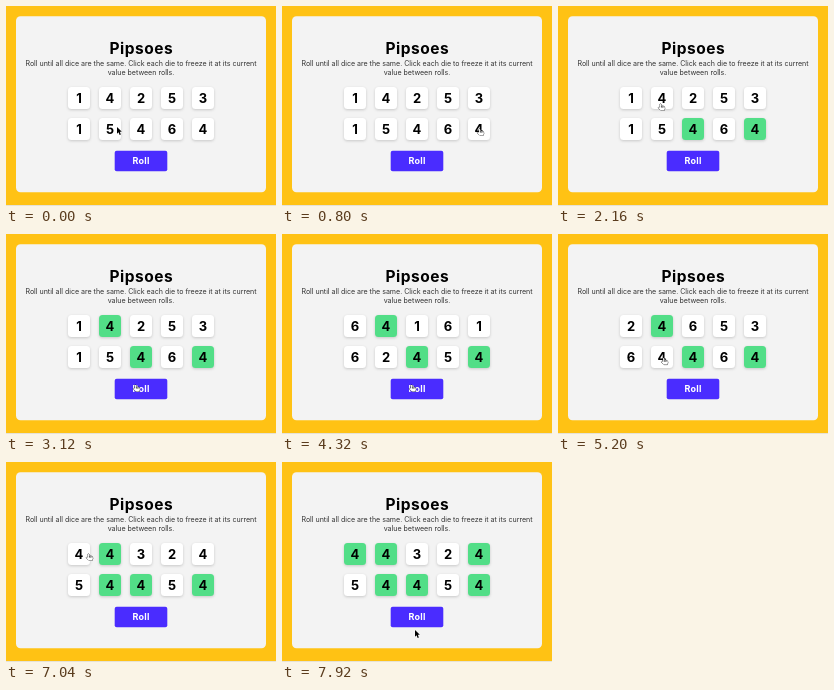
Animation, 270 px wide and 200 px high, one loop 8000 ms. Source, as an HTML page with a canvas:

```html
<!DOCTYPE html>
<html lang="en">
<head>
<meta charset="utf-8">
<title>Dice game</title>
<style>
  html, body { margin: 0; width: 100%; height: 100%; overflow: hidden; background: #ffc214; }
  canvas { display: block; width: 270px; height: 200px; }
</style>
</head>
<body>
<canvas id="stage"></canvas>
<script>
const W = 270, H = 200, LOOP = 8000;
const HOLD = 160, TRAVEL = 640;
const SANS = 'Inter, "Open Sans", sans-serif';
const BUTTON = { x: 108.7, y: 144.7, w: 52.6, h: 20.6 };

const canvas = document.getElementById('stage');
const ctx = canvas.getContext('2d');
const dpr = window.devicePixelRatio || 1;
canvas.width = W * dpr;
canvas.height = H * dpr;

const dice = Array.from({ length: 10 }, (_, i) => ({
  x: 62 + (i % 5) * 31,
  y: 81 + Math.floor(i / 5) * 31,
  w: 22,
  h: 22
}));

// Each burst of rolls tumbles at random and lands on its faces
const bursts = [
  { from: 0, to: 0, rolls: 1, faces: '1425315464' },
  { from: 3200, to: 4080, rolls: 4, faces: '6416162454' },
  { from: 4640, to: 4800, rolls: 2, faces: '2465364464' },
  { from: 5920, to: 6160, rolls: 3, faces: '4432454454' }
];

// The pointer arrives at each stop, waits, clicks and leaves
const stops = [
  [0, 111, 121], [440, 142, 156], [800, 197, 123], [1500, 135, 122],
  [2160, 102, 98], [2880, 129, 151], [5280, 104, 123], [5760, 130, 150],
  [7040, 82, 92], [7440, 194, 94], [7920, 133, 168]
].map(([at, x, y]) => ({ at, x, y }));

const inside = (p, r) => p.x >= r.x && p.x <= r.x + r.w && p.y >= r.y && p.y <= r.y + r.h;

for (const stop of stops.slice(1)) {
  const die = dice.find(d => inside(stop, d));
  if (die) die.frozen = stop.at + HOLD;
}

function random(seed) {
  const v = Math.sin(seed * 12.9898) * 43758.5453;
  return v - Math.floor(v);
}

function facesAt(t) {
  const b = bursts.findLast(b => b.from <= t);
  if (t >= b.to) return [...b.faces];
  const roll = Math.floor((t - b.from) / (b.to - b.from) * (b.rolls - 1));
  return dice.map((d, i) =>
    t >= d.frozen ? '4' : String(1 + Math.floor(random(b.from + roll * 10 + i) * 6)));
}

function pointerAt(t) {
  const k = stops.findIndex(s => s.at > t);
  if (k < 0) return stops.at(-1);
  const a = stops[k - 1], b = stops[k];
  const leave = Math.max(a.at + HOLD, b.at - TRAVEL);
  const u = Math.max(0, (t - leave) / (b.at - leave));
  const e = u * u * (3 - 2 * u);
  return { x: a.x + (b.x - a.x) * e, y: a.y + (b.y - a.y) * e };
}

function box(r, radius, fill) {
  ctx.fillStyle = fill;
  ctx.beginPath();
  ctx.roundRect(r.x, r.y, r.w, r.h, radius);
  ctx.fill();
}

function label(str, x, y, font, fill, spacing = 0) {
  ctx.font = font + ' ' + SANS;
  ctx.letterSpacing = spacing + 'px';
  ctx.fillStyle = fill;
  ctx.textAlign = 'center';
  ctx.fillText(str, x + spacing / 2, y);
}

function drawDie(d, face, held) {
  ctx.save();
  ctx.shadowColor = 'rgba(0,0,0,.18)';
  ctx.shadowBlur = 3 * dpr;
  ctx.shadowOffsetY = dpr;
  box(d, 3.5, held ? '#52de87' : '#fff');
  ctx.restore();
  label(face, d.x + 11, d.y + 15.8, 'bold 13px', '#000');
}

function drawPointer({ x, y }, hand) {
  const p = new Path2D(hand
    ? 'M0 0Q1 -.4 1.3 .5L1.8 2.4Q3.5 2 5 3Q6 4.5 4.9 7.3H1L-2 4.3Q-1.6 3 .2 4Z'
    : 'M0 0V7.6L1.8 6L3 9L4.4 8.4L3.2 5.5H5.5Z');
  ctx.save();
  ctx.translate(x, y);
  ctx.scale(0.88, 0.88);
  ctx.lineJoin = 'round';
  ctx.fillStyle = hand ? '#fff' : '#000';
  ctx.strokeStyle = hand ? '#111' : '#fff';
  ctx.lineWidth = 0.9;
  ctx.stroke(p);
  ctx.fill(p);
  if (hand) ctx.stroke(new Path2D('M1.8 2.4V4M3.3 2.5V4.2'));
  ctx.restore();
}

function draw(t) {
  ctx.setTransform(dpr, 0, 0, dpr, 0, 0);
  ctx.fillStyle = '#ffc214';
  ctx.fillRect(0, 0, W, H);
  ctx.fillStyle = '#e6e2d6';
  ctx.fillRect(0, H - 1, W, 1);
  box({ x: 10, y: 10.3, w: 250, h: 176 }, 4.5, '#f3f3f3');

  label('Pipsoes', 135, 48, 'bold 15.5px', '#000', 0.5);
  label('Roll until all dice are the same. Click each die to freeze it at its current',
    135, 60, '7.06px', '#333');
  label('value between rolls.', 135, 68.5, '7.06px', '#333');

  const faces = facesAt(t);
  dice.forEach((d, i) => drawDie(d, faces[i], t >= d.frozen));

  box(BUTTON, 2, '#4a2cff');
  label('Roll', 135, 158.3, 'bold 9px', '#fff', 0.3);

  const p = pointerAt(t);
  drawPointer(p, t > HOLD && [BUTTON, ...dice].some(r => inside(p, r)));
}

const start = performance.now();
function tick() {
  draw((performance.now() - start) % LOOP);
  requestAnimationFrame(tick);
}
tick();
</script>
</body>
</html>
```
